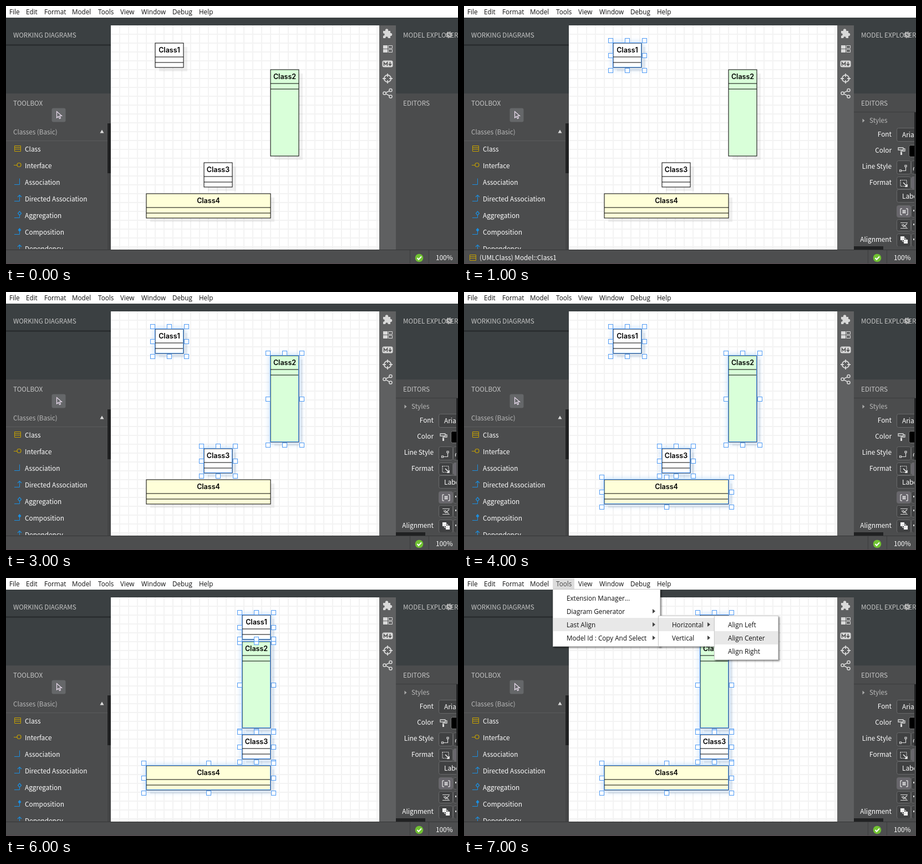
An HTML page with a canvas for the animation above (8 s loop, 815 by 466 pixels).

```html
<!DOCTYPE html>
<html lang="en">
<head>
<meta charset="utf-8">
<title>Aligning classes</title>
<style>
  html, body { margin: 0; width: 100%; height: 100%; overflow: hidden; background: #4b4c4d; }
  canvas { display: block; }
</style>
</head>
<body>
<canvas id="stage" width="815" height="466"></canvas>
<script>
const ctx = document.getElementById('stage').getContext('2d');
const FAMILY = '"Noto Sans CJK JP", "Noto Sans CJK SC", "Noto Sans CJK", "Open Sans", sans-serif';
const UI = '11.7px ' + FAMILY;
const LABEL = '500 11.8px ' + FAMILY;
const MENU = '11.7px "Open Sans", "Noto Sans", sans-serif';
const CLASS = '600 12.5px Inter, "Liberation Sans", sans-serif';
const BLUE = '#1b8fe0', GOLD = '#c4a000', ICON = '#d9d9d9', TOOLBAR = '#5f6061';

function rect(x, y, w, h, color) {
  ctx.fillStyle = color;
  ctx.fillRect(x, y, w, h);
}
function outline(x, y, w, h, color) {
  ctx.strokeStyle = color;
  ctx.lineWidth = 1;
  ctx.strokeRect(x, y, w, h);
}
function text(string, x, y, color, font = UI, align = 'left') {
  ctx.font = font;
  ctx.textAlign = align;
  ctx.fillStyle = color;
  ctx.fillText(string, x, y);
}
function line(path, color, width = 1) {
  ctx.strokeStyle = color;
  ctx.lineWidth = width;
  ctx.stroke(new Path2D(path));
}
function fill(path, color) {
  ctx.fillStyle = color;
  ctx.fill(new Path2D(path));
}
function disc(x, y, r, color) {
  ctx.fillStyle = color;
  ctx.beginPath();
  ctx.arc(x, y, r, 0, 7);
  ctx.fill();
}
function ring(x, y, r, color, width = 1) {
  ctx.strokeStyle = color;
  ctx.lineWidth = width;
  ctx.beginPath();
  ctx.arc(x, y, r, 0, 7);
  ctx.stroke();
}
function rounded(x, y, w, h, color, border) {
  ctx.beginPath();
  ctx.roundRect(x + .5, y + .5, w - 1, h - 1, 3);
  ctx.fillStyle = color;
  ctx.fill();
  if (border) {
    ctx.strokeStyle = border;
    ctx.lineWidth = 1;
    ctx.stroke();
  }
}
function clipped(x, y, w, h, draw) {
  ctx.save();
  ctx.beginPath();
  ctx.rect(x, y, w, h);
  ctx.clip();
  draw();
  ctx.restore();
}

function drawMenuBar(open) {
  rect(0, 0, 815, 21, '#fff');
  if (open) rect(160, 1, 39, 20, '#dcdcdc');
  const items = { File: 6, Edit: 36, Format: 69, Model: 119, Tools: 166, View: 206, Window: 244, Debug: 300, Help: 348 };
  for (const [name, x] of Object.entries(items)) text(name, x, 15, open && name === 'Tools' ? '#444' : '#111', MENU);
}

function classIcon(x, y) {
  line(`M${x} ${y}h11v10h-11zM${x} ${y + 3}h11M${x} ${y + 6}h11`, GOLD);
}

function drawToolbox() {
  rect(0, 21, 189, 137, '#3b4042');
  rect(0, 69, 189, 3, '#2b2f31');
  text('WORKING DIAGRAMS', 13, 57, '#c6c6c6');
  text('TOOLBOX', 13, 180, '#c6c6c6');
  rounded(82, 184, 26, 26, '#656769');
  line('M91.5 190.5v11.5l3-2.5l2 4l2-1l-2-4h4z', '#eedff2', 1.2);
  text('Classes (Basic)', 13, 232, '#b8b8b8');
  fill('M169.5 229.5h7l-3.5-6z', '#ddd');
  rect(0, 243, 183, 1, '#5a5b5c');
  rect(183, 212, 6, 228, '#444546');
  rect(183, 212, 6, 90, '#202122');

  clipped(0, 244, 183, 195, () => {
    ['Class', 'Interface', 'Association', 'Directed Association', 'Aggregation', 'Composition', 'Dependency']
      .forEach((name, i) => text(name, 34, 263 + 30 * i, '#fff', LABEL));
    classIcon(15.5, 252.5);
    line('M14 287.5h6', GOLD);
    ring(23.5, 287, 3.5, GOLD, 1.2);
    for (let y = 322; y < 443; y += 30) line(`M15 ${y + .5}h9.5v-11`, BLUE);
    for (const y of [341, 431]) line(`M21 ${y + 4}l3.5-3.5l3.5 3.5`, BLUE, 1.2);
    const diamond = y => `M24.5 ${y}l3 3.5l-3 3.5l-3-3.5z`;
    fill(diamond(371), '#4b4c4d');
    line(diamond(371), BLUE, 1.2);
    fill(diamond(401), BLUE);
  });
}

function drawToolbar() {
  rect(673, 35, 30, 405, TOOLBAR);
  rect(680, 45, 13, 13, ICON);
  disc(686.5, 44, 2.7, ICON);
  disc(693.5, 51.5, 2.7, ICON);
  disc(680.5, 51.5, 2.2, TOOLBAR);
  disc(686.5, 57.5, 2.2, TOOLBAR);
  rect(680, 71, 8, 6, ICON);
  rect(680, 78, 8, 6, ICON);
  line('M689.5 71.5h7v5h-7zM689.5 78.5h7v5h-7z', ICON);
  rounded(678, 98, 20, 13, ICON);
  line('M681.5 108v-6l3 3.5l3-3.5v6M692.5 101v6M690 104.5l2.5 3l2.5-3', '#555', 1.6);
  ring(688, 131, 6.3, ICON, 1.8);
  line('M679 131h6M691 131h6M688 122v6M688 134v6', ICON, 1.8);
  line('M694 152l-11 5.5l11 6', ICON, 1.5);
  for (const [x, y] of [[693.5, 152], [682.5, 157.5], [693.5, 163.5]]) {
    disc(x, y, 2.6, TOOLBAR);
    ring(x, y, 2.6, ICON, 1.5);
  }
}

function drawStyles() {
  rect(703, 191, 112, 1, '#3a3b3c');
  fill('M718.5 203.5v7l4-3.5z', '#aaa');
  text('Styles', 731, 211, '#b8b8b8');
  const labels = { Font: 236, Color: 265, 'Line Style': 294, Format: 323, Alignment: 426 };
  for (const [name, y] of Object.entries(labels)) text(name, 771, y, '#fff', LABEL, 'right');

  clipped(703, 192, 109, 242, () => {
    const edge = '#68696a', dark = '#404142', lit = '#68666c';
    rounded(780, 220, 60, 25, dark, edge);
    text('Arial', 790, 237, '#fff', LABEL);
    rounded(802, 251, 30, 22, '#000', '#777');
    for (const [y, h, color] of [[279, 25, dark], [308, 23, dark], [360, 22, lit], [385, 22, dark], [411, 24, dark]]) {
      rounded(806, y, 26, h, y === 308 ? lit : dark, edge);
      rounded(780, y, 26, h, color, edge);
    }
    rounded(780, 331, 60, 24, dark, edge);
    text('Label', 790, 348, '#fff', LABEL);

    line('M783 256h9v4h-9zM792 258h3v4h-7v2', ICON, 1.3);
    rect(787, 264, 3, 5, ICON);
    line('M789 297.5h7.5v-7M785.5 296h3v3h-3zM795 287.5h3v3h-3z', ICON, 1.2);
    line('M810.5 297v-4l4-4', ICON, 1.3);
    ctx.setLineDash([2, 1]);
    line('M787 314.5h11v11h-11z', ICON, 1.2);
    ctx.setLineDash([]);
    line('M792 319l7 7m0-4v4h-4', '#fff', 1.4);
    line('M790 366h-3v11h3M797 366h3v11h-3M790.5 370h6M790.5 373h6M792 368v7M795 368v7', '#fff');
    line('M787 391.5h13M787 401.5h13M789 395l4 4l6-6M791 394l7 6', ICON, 1.2);
    rect(787, 416, 7, 7, '#fff');
    rect(793, 422, 7, 7, '#fff');
    line('M790.5 419.5h6v6h-6z', ICON);
    for (const y of [368, 393, 420]) rect(810, y, 2, 3, ICON);
  });
  rect(703, 434, 53, 6, '#202122');
  rect(812, 192, 3, 111, '#202122');
}

function drawRightPanel(editing) {
  rect(703, 21, 112, 137, '#3b4042');
  text('MODEL EXPLORER', 716, 57, '#c6c6c6');
  ring(799, 52, 3.2, '#bbb', 2);
  ctx.setLineDash([2, 1.93]);
  ring(799, 52, 5, '#bbb', 2);
  ctx.setLineDash([]);
  text('EDITORS', 716, 180, '#c6c6c6');
  if (editing) drawStyles();
}

function drawStatusBar(single) {
  rect(0, 440, 815, 26, '#4d4e4f');
  rect(0, 440, 815, 1, '#363738');
  rect(0, 465, 815, 1, '#5a4a50');
  rect(728, 441, 1, 24, '#3b3c3d');
  rect(762, 441, 1, 24, '#3b3c3d');
  if (single) {
    classIcon(10.5, 449.5);
    text('(UMLClass) Model::Class1', 28, 459, '#fff', LABEL);
  }
  disc(745, 455, 7.3, '#70c232');
  line('M741.5 455l2.5 3l5-5.5', '#fff', 2);
  text('100%', 775, 459, '#fff', LABEL);
}

// Box edges lie on whole pixels, so one-pixel strokes spread into two grey ones.
function drawClass({ name, x, y, w, h, color }) {
  rect(x, y, w, h, color);
  outline(x, y, w, h, '#000');
  line(`M${x} ${y + 25}h${w}M${x} ${y + 35}h${w}`, '#000');
  text(name, x + w / 2, y + 17, '#000', CLASS, 'center');
}
function drawGlow({ x, y, w, h }) {
  ctx.save();
  ctx.shadowColor = 'rgba(70,150,235,.32)';
  ctx.shadowBlur = 9;
  rect(x - 2, y - 2, w + 5, h + 5, '#e3eefa');
  ctx.restore();
}
function drawSelection({ x, y, w, h }) {
  outline(x - .5, y - .5, w, h, '#3d8df0');
  for (const cy of [y - 4.5, y + h / 2, y + h + 5.5])
    for (const cx of [x - 4.5, x + w / 2, x + w + 5.5]) {
      if (cx === x + w / 2 && cy === y + h / 2) continue;
      const left = Math.floor(cx) - 3.5, top = Math.floor(cy) - 3.5;
      rect(left, top, 8, 8, '#fff');
      outline(left, top, 8, 8, '#4f9bf5');
    }
}

function drawDiagram(selected, aligned) {
  rect(189, 35, 484, 405, '#fff');
  for (let x = 205; x < 673; x += 16) rect(x - 1, 35, 2, 405, '#f3f3f3');
  for (let y = 51; y < 440; y += 16) rect(189, y - 1, 484, 2, '#f3f3f3');
  const classes = [
    { name: 'Class1', x: aligned ? 426 : 269, y: 67, w: 51, h: 44, color: '#fff' },
    { name: 'Class2', x: aligned ? 426 : 477, y: 115, w: 51, h: 156, color: '#d9ffd9' },
    { name: 'Class3', x: aligned ? 426 : 357, y: 283, w: 51, h: 44, color: '#fff' },
    { name: 'Class4', x: 253, y: 339, w: 224, h: 44, color: '#ffffd9' },
  ];
  const chosen = classes.slice(0, selected);
  for (const c of classes) rect(c.x + 7, c.y + 7, c.w, c.h, 'rgba(0,0,0,.06)');
  chosen.forEach(drawGlow);
  classes.forEach(drawClass);
  chosen.forEach(drawSelection);
}

function drawPopup(x, y, w, items, active, arrows) {
  const h = items.length * 24 + 8;
  ctx.save();
  ctx.shadowColor = 'rgba(0,0,0,.5)';
  ctx.shadowBlur = 3;
  ctx.shadowOffsetX = ctx.shadowOffsetY = 2;
  rect(x, y, w, h, '#ccc');
  ctx.restore();
  rect(x + 1, y + 1, w - 2, h - 2, '#fff');
  items.forEach((item, i) => {
    const top = y + 4 + 24 * i;
    if (i === active) rect(x + 1, top, w - 2, 24, '#e8e8e8');
    text(item, x + 25, top + 17, '#111', MENU);
    if (arrows && item !== 'Extension Manager...') fill(`M${x + w - 14} ${top + 8}v8l5-4z`, '#444');
  });
}

function drawPopups(active) {
  drawPopup(160, 20, 194, ['Extension Manager...', 'Diagram Generator', 'Last Align', 'Model Id : Copy And Select'], 2, true);
  drawPopup(350, 68, 103, ['Horizontal', 'Vertical'], 0, true);
  drawPopup(451, 68, 116, ['Align Left', 'Align Center', 'Align Right'], active, false);
}

function frame() {
  const step = Math.floor(performance.now() % 8000 / 1000);
  const menuOpen = step === 5 || step === 7;
  rect(0, 0, 815, 466, '#4b4c4d');
  rect(0, 21, 815, 14, '#3b4042');
  drawToolbox();
  drawDiagram(Math.min(step, 4), step >= 6);
  drawToolbar();
  drawRightPanel(step > 0);
  drawStatusBar(step === 1);
  drawMenuBar(menuOpen);
  if (menuOpen) drawPopups(step === 5 ? 2 : 1);
  requestAnimationFrame(frame);
}
frame();
</script>
</body>
</html>
```
